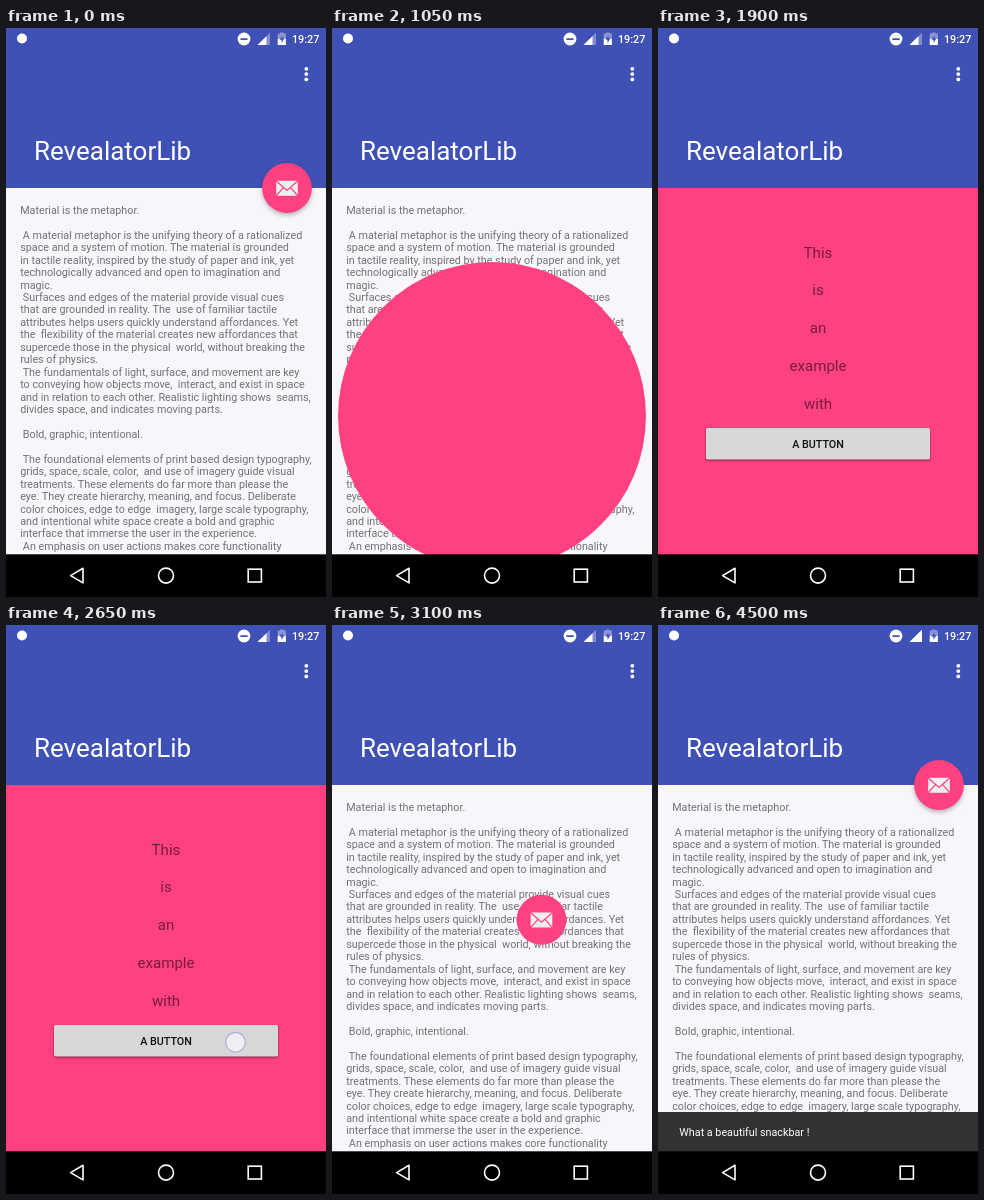
Animation, 320 px wide and 569 px high, one loop 4550 ms. Source, as an HTML page:

```html
<!DOCTYPE html>
<html lang="en">
<head>
<meta charset="utf-8">
<title>Reveal demo</title>
<style>
  html, body { margin: 0; width: 100%; height: 100%; overflow: hidden; background: #000; }
  svg { display: block; width: 100%; height: 100%; font-family: Roboto, sans-serif; }
  text { white-space: pre; }
  .body text { font-size: 10.77px; fill: #000; fill-opacity: .54; }
  .kid { font-size: 15.1px; fill: #000; fill-opacity: .54; text-anchor: middle; }
</style>
</head>
<body>
<svg viewBox="0 0 320 569">
  <defs>
    <filter id="soft" x="-30%" y="-30%" width="160%" height="160%"><feGaussianBlur stdDeviation="2.6"/></filter>
    <filter id="thin" x="-5%" y="-30%" width="110%" height="160%"><feGaussianBlur stdDeviation=".9"/></filter>
    <clipPath id="page"><rect y="160" width="320" height="367"/></clipPath>
    <clipPath id="hole"><circle id="holeShape" cx="160" cy="388" r="0"/></clipPath>
  </defs>

  <rect width="320" height="161" fill="#3f51b5"/>
  <text x="27.9" y="132.2" font-size="26" fill="#fff">RevealatorLib</text>
  <g fill="#fff">
    <circle cx="300.3" cy="40.8" r="1.9"/><circle cx="300.3" cy="46.1" r="1.9"/><circle cx="300.3" cy="51.4" r="1.9"/>
    <circle cx="16" cy="10.5" r="5"/>
    <circle cx="238" cy="11" r="6.4"/>
    <path d="M251.5 17L264 4.8V17Z" fill-opacity=".35"/>
    <path id="signal"/>
    <path d="M271.7 5.6h2.4v-1.2h3.4v1.2h2.4v5h-8.2Z" fill-opacity=".4"/>
    <path d="M271.7 10.6h8.2v6.4h-8.2Z"/>
    <text x="285.9" y="15" font-size="10.8" font-weight="500">19:27</text>
  </g>
  <path d="M234.4 10.2h7.2v1.7h-7.2Z M276.5 7.2l-3 4.6h2v3.2l3-4.8h-2Z" fill="#3f51b5"/>

  <g clip-path="url(#page)">
    <rect y="160" width="320" height="367" fill="#f8f5fb"/>
    <g class="body" id="lines"></g>
    <g id="reveal" clip-path="url(#hole)">
      <rect y="160" width="320" height="367" fill="#ff4081"/>
      <g id="kids"></g>
    </g>
    <g id="snack">
      <rect y="487" width="320" height="40" fill="#323232"/>
      <text id="snackText" x="21.3" y="510.8" font-size="10.77" fill="#fff">What a beautiful snackbar !</text>
    </g>
  </g>

  <g id="fab">
    <circle id="fabShadow" cy="2.4" r="24.4" fill="#000" filter="url(#soft)"/>
    <circle id="fabFace" r="24.9"/>
    <rect x="-10.8" y="-7.2" width="21.6" height="15" rx=".8" fill="#efefef"/>
    <path id="fold" d="M-11-7.2L0 2.4L11-7.2 M-11 8L-3.4-.6 M11 8L3.4-.6" fill="none" stroke-width="1.2"/>
  </g>
  <circle id="touch" r="9.8" fill="#f0eef5" stroke="#b4acd6" stroke-width="1.2"/>

  <rect y="526.3" width="320" height="43" fill="#000"/>
  <g fill="none" stroke="#fff" stroke-width="1.6">
    <path d="M64.6 547.6L77 540.3V554.9Z" stroke-linejoin="round"/>
    <circle cx="160" cy="547.6" r="7.5"/>
    <rect x="242.2" y="541.2" width="13.2" height="12.8"/>
  </g>
</svg>
<script>
const LOOP = 4550, STEP = 50;
const NS = "http://www.w3.org/2000/svg";
const HOME = [281, 160], CENTER = [160, 388];
const FAB_R = 24.9, FULL_R = 280;
const $ = id => document.getElementById(id);

const copy = `Material is the metaphor.

 A material metaphor is the unifying theory of a rationalized
space and a system of motion. The material is grounded
in tactile reality, inspired by the study of paper and ink, yet
technologically advanced and open to imagination and
magic.
 Surfaces and edges of the material provide visual cues
that are grounded in reality. The  use of familiar tactile
attributes helps users quickly understand affordances. Yet
the  flexibility of the material creates new affordances that
supercede those in the physical  world, without breaking the
rules of physics.
 The fundamentals of light, surface, and movement are key
to conveying how objects move,  interact, and exist in space
and in relation to each other. Realistic lighting shows  seams,
divides space, and indicates moving parts.

 Bold, graphic, intentional.

 The foundational elements of print based design typography,
grids, space, scale, color,  and use of imagery guide visual
treatments. These elements do far more than please the
eye. They create hierarchy, meaning, and focus. Deliberate
color choices, edge to edge  imagery, large scale typography,
and intentional white space create a bold and graphic
interface that immerse the user in the experience.
 An emphasis on user actions makes core functionality`;

function add(parent, tag, attrs, text) {
  const el = document.createElementNS(NS, tag);
  for (const k in attrs) el.setAttribute(k, attrs[k]);
  if (text) el.textContent = text;
  return parent.appendChild(el);
}
const set = (id, name, value) => $(id).setAttribute(name, value);
const show = (id, on) => { $(id).style.display = on ? "" : "none"; };

copy.split("\n").forEach((line, i) =>
  add($("lines"), "text", { x: 14.2, y: 185.9 + i * 12.444 }, line));

// Each child grows around its own middle.
const kids = ["This", "is", "an", "example", "with"].map((word, i) => {
  const g = add($("kids"), "g", {});
  add(g, "text", { class: "kid", y: 5.2 }, word);
  return { g, y: 224.3 + i * 37.9 };
});
const button = add($("kids"), "g", {});
add(button, "rect", { x: -112, y: -14.6, width: 224, height: 31.4, rx: 1.8, fill: "#000", "fill-opacity": .5, filter: "url(#thin)" });
add(button, "rect", { x: -112, y: -15.8, width: 224, height: 31.6, rx: 1.8, fill: "#d6d7d7" });
add(button, "text", { y: 3.9, "font-size": 10.77, "font-weight": 500, "text-anchor": "middle", fill: "#111" }, "A BUTTON");
kids.push({ g: button, y: 415.7 });

const ramp = (t, from, to) => Math.min(1, Math.max(0, (t - from) / (to - from)));
const ease = x => (1 - Math.cos(Math.PI * x)) / 2;
const mix = (a, b, k) => a + (b - a) * k;

// Fast-out, slow-in curve: bezier(.4, 0, .2, 1)
function fastOut(x) {
  let lo = 0, hi = 1;
  for (let i = 0; i < 20; i++) {
    const s = (lo + hi) / 2, r = 1 - s;
    if (1.2 * r * r * s + .6 * r * s * s + s * s * s < x) lo = s; else hi = s;
  }
  return 3 * (1 - lo) * lo * lo + lo * lo * lo;
}

function drawFab(t) {
  const away = ease(ramp(t, 796, 916)) - ease(ramp(t, 3047, 3167));
  const pressed = t < 2000 ? ramp(t, 700, 800) : 0;
  const face = `rgb(${mix(255, 237, pressed)},${mix(64, 58, pressed)},${mix(129, 116, pressed)})`;
  show("fab", t < 916 || t >= 3047);
  set("fab", "transform", `translate(${mix(HOME[0], CENTER[0], away)} ${mix(HOME[1], CENTER[1], away)})`);
  set("fabFace", "fill", face);
  set("fold", "stroke", face);
  set("fabShadow", "fill-opacity", t < 916 ? .3 : .3 * ramp(t, 3167, 3300));
}

function drawReveal(t) {
  const open = ease(ramp(t, 916, 1182)) - ease(ramp(t, 2782, 3047));
  show("reveal", t >= 916 && t < 3047);
  set("holeShape", "r", mix(FAB_R, FULL_R, open));
  kids.forEach(({ g, y }, i) => {
    const start = 1213 + i * 39.5;
    g.setAttribute("transform", `translate(160 ${y}) scale(${ease(ramp(t, start, start + 420))})`);
  });
}

function drawTouch(t) {
  const first = t < 2000;
  const alpha = first ? (t >= 700) * (1 - ramp(t, 770, 862)) : (t >= 2650) * (1 - ramp(t, 2710, 2820));
  set("touch", "transform", first ? "translate(285 155)" : "translate(229.5 417.2)");
  set("touch", "opacity", alpha);
}

function drawSnack(t) {
  show("snack", t >= 3190);
  set("snack", "transform", `translate(0 ${40 * (1 - fastOut(ramp(t, 3200, 3450)))})`);
  set("snackText", "opacity", ramp(t, 3270, 3450));
}

function draw(t) {
  set("signal", "d", t >= 4500 ? "M251.5 17L264 4.8V17Z" : "M251.5 17L260.5 8.2V17Z");
  drawFab(t);
  drawReveal(t);
  drawTouch(t);
  drawSnack(t);
}

const began = performance.now();
function tick() {
  const t = performance.now() - began + 1;
  draw(Math.floor(t / STEP) * STEP % LOOP);
  requestAnimationFrame(tick);
}
draw(0);
requestAnimationFrame(tick);
</script>
</body>
</html>
```
